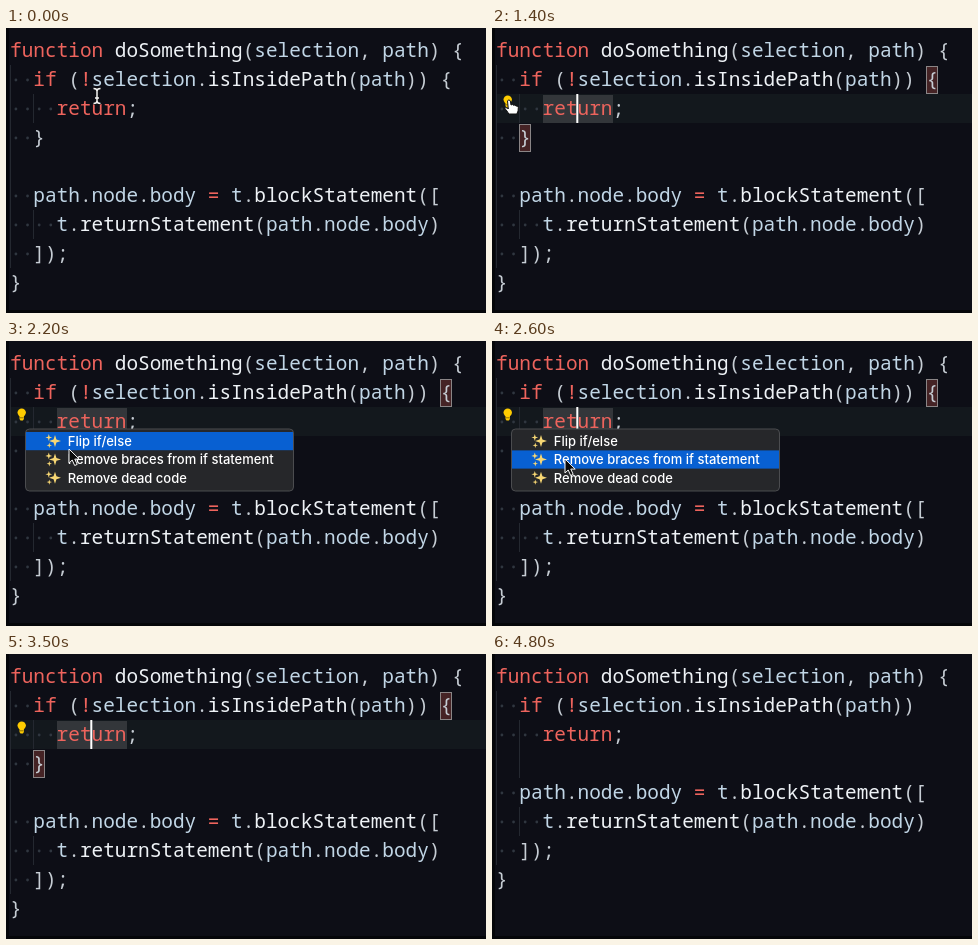
Write an HTML page that moves like this. It is 480 px wide and 285 px high and loops after 5000 ms.

```html
<!DOCTYPE html>
<html lang="en">
<head>
<meta charset="utf-8">
<title>Code action demo</title>
<style>
  html, body { margin: 0; width: 100%; height: 100%; overflow: hidden; background: #0d0e16; }
  svg { display: block; width: 480px; height: 285px; }
  .code { font: 500 19.4px "Noto Sans Mono", "DejaVu Sans Mono", monospace; white-space: pre; }
  .menu { font: 500 13px Inter, "Liberation Sans", sans-serif; fill: #fff; }
  .key { fill: #ee645d; }
  .call { fill: #eef2f6; }
  .name { fill: #c1d6e6; }
  .mark { fill: #c6cdd4; }
</style>
</head>
<body>
<svg id="stage" viewBox="0 0 480 285">
  <rect width="480" height="285" fill="#0d0e16"/>
  <g id="focus">
    <rect x="4" y="66" width="476" height="29" fill="#13181d"/>
    <rect x="51" y="67" width="70" height="28" fill="#33363a"/>
    <g fill="#452325" stroke="#8a8586">
      <rect x="434.5" y="38.5" width="11" height="27"/>
      <rect x="27.5" y="96.5" width="11" height="27"/>
    </g>
  </g>
  <g id="before" class="code"></g>
  <g id="after" class="code"></g>
  <rect width="3" height="285" fill="#050609"/>
  <rect y="282" width="480" height="3" fill="#050609"/>
  <rect id="caret" x="84.3" y="66" width="2" height="29" fill="#fff"/>
  <g id="bulb" fill="#fc0">
    <circle cx="15.7" cy="71.6" r="4.2"/>
    <path d="M13.5 74.5h4.4v3.5l-1 1.5h-2.4l-1-1.5z"/>
    <path d="M13.8 76.8h3.8" stroke="#5b4a10" stroke-width=".7"/>
  </g>
  <g id="menu" class="menu">
    <rect x="19.5" y="88" width="268" height="62" rx="4" fill="#26272a" stroke="#4b4c4f"/>
    <rect id="pick" x="20" width="267" height="18.2" fill="#0860d2"/>
  </g>
  <g id="beam" fill="none">
    <path d="M-3.5 -7.5Q0 -7.5 0 -5V5Q0 7.5 -3.5 7.5M3.5 -7.5Q0 -7.5 0 -5V5Q0 7.5 3.5 7.5M-2 2H2" stroke="#111" stroke-width="3"/>
    <path d="M-3.5 -7.5Q0 -7.5 0 -5V5Q0 7.5 -3.5 7.5M3.5 -7.5Q0 -7.5 0 -5V5Q0 7.5 3.5 7.5M-2 2H2" stroke="#f4f4f4" stroke-width="1.5"/>
  </g>
  <path id="hand" d="M-1.5 .8Q0 -1 1.3 .8L2 5Q3.5 3.8 4.5 5.3Q6 4.5 7 6Q9 5.6 9.3 7.5Q9.6 11 7.8 14H-.2Q-1.5 11 -4 8.7Q-3.8 6.7 -1.5 8.2L-.7 9Z" fill="#fff" stroke="#111"/>
  <path id="arrow" d="M0 0V14L3.2 11L5.7 16.5L8.2 15.4L5.8 10.1H10.2Z" fill="#0a0a0a" stroke="#f4f4f4"/>
</svg>
<script>
const NS = "http://www.w3.org/2000/svg";
const LOOP = 5000, STEP = 100;
const COL = 11.63, ROW = 29, LEFT = 4.1;
const PICK = 91, PITCH = 18.4;
const CLICK = 400, OPEN = 1600, FADE = 3280, CLOSE = 3440, EDIT = 3600;
const $ = id => document.getElementById(id);

function add(parent, tag, attrs, text) {
  const el = document.createElementNS(NS, tag);
  for (const k in attrs) el.setAttribute(k, attrs[k]);
  if (text) el.textContent = text;
  parent.append(el);
  return el;
}

function kind(token, rest) {
  if (/^(function|if|return|!|=)$/.test(token)) return "key";
  if (/^\w/.test(token)) return rest[0] === "(" ? "call" : "name";
  return "mark";
}

function drawCode(group, lines) {
  lines.forEach((line, row) => {
    const top = 8 + row * ROW;
    const inner = row > 0 && row < lines.length - 1;
    const indent = line.search(/\S/);
    // a blank line after deeper code keeps that code's guide
    const deep = indent > 2 || (indent < 0 && lines[row - 1].startsWith("    "));
    if (inner) add(group, "rect", { x: 4, y: top, width: 1, height: ROW, fill: "#242830" });
    if (deep) add(group, "rect", { x: 27, y: top, width: 1, height: ROW, fill: "#242830" });
    for (let i = 0; i < indent; i++)
      add(group, "circle", { cx: LEFT + (i + .5) * COL, cy: top + 15, r: 1.4, fill: "#303740" });
    for (const m of line.matchAll(/\w+|[!=]|[^\w\s!=]+/g)) {
      const rest = line.slice(m.index + m[0].length);
      add(group, "text", { x: LEFT + m.index * COL, y: top + 21.3, class: kind(m[0], rest) }, m[0]);
    }
  });
}

const head = "function doSomething(selection, path) {";
const test = "  if (!selection.isInsidePath(path))";
const tail = [
  "",
  "  path.node.body = t.blockStatement([",
  "    t.returnStatement(path.node.body)",
  "  ]);",
  "}"
];
drawCode($("before"), [head, test + " {", "    return;", "  }", ...tail]);
drawCode($("after"), [head, test, "    return;", ...tail]);

function star(x, y, r) {
  const q = r * .24;
  add($("menu"), "path", {
    d: `M${x} ${y - r}L${x + q} ${y - q}L${x + r} ${y}L${x + q} ${y + q}L${x} ${y + r}L${x - q} ${y + q}L${x - r} ${y}L${x - q} ${y - q}Z`,
    fill: "#f7d774"
  });
}
["Flip if/else", "Remove braces from if statement", "Remove dead code"].forEach((label, i) => {
  const y = 100 + i * PITCH;
  star(49, y, 6);
  star(42.8, y - 3.5, 3.4);
  star(43.3, y + 4.3, 2.7);
  add($("menu"), "text", { x: 61.8, y: y + 4.8 }, label);
});

// time, x, y of the pointer's hot spot
const path = [
  [0, 91, 68], [300, 87, 80], [600, 87, 80], [1200, 17, 72],
  [1600, 17, 72], [2000, 63, 108], [2300, 63, 108], [2500, 73, 118], [LOOP, 73, 118]
];

function pointer(t) {
  const i = path.findIndex(p => p[0] > t);
  const [t0, x0, y0] = path[i - 1], [t1, x1, y1] = path[i];
  const k = (t - t0) / (t1 - t0), e = k * k * (3 - 2 * k);
  return [x0 + (x1 - x0) * e, y0 + (y1 - y0) * e];
}

const show = (id, on) => $(id).setAttribute("visibility", on ? "visible" : "hidden");

function draw(t) {
  const [x, y] = pointer(t);
  const focus = t >= CLICK && t < EDIT;
  const open = t >= OPEN && t < CLOSE;
  const row = Math.floor((y - PICK) / PITCH);
  const shape = t >= CLOSE ? "" : t < 1000 ? "beam" : t < 1700 ? "hand" : "arrow";

  show("before", t < EDIT);
  show("after", t >= EDIT);
  show("focus", focus);
  show("caret", focus && (t - CLICK) % 1000 < 500);
  show("bulb", focus && t >= 600);
  show("menu", open);
  $("menu").setAttribute("opacity", Math.min(1, (CLOSE - t) / (CLOSE - FADE)));
  show("pick", open && x > 19 && row >= 0);
  $("pick").setAttribute("y", PICK + Math.max(row, 0) * PITCH);
  for (const id of ["beam", "hand", "arrow"]) show(id, id === shape);
  if (shape) $(shape).setAttribute("transform", `translate(${x} ${y})`);
}

const start = performance.now();
function tick() {
  const t = (performance.now() - start) % LOOP;
  draw(Math.floor(t / STEP) * STEP);
  requestAnimationFrame(tick);
}
tick();
</script>
</body>
</html>
```
